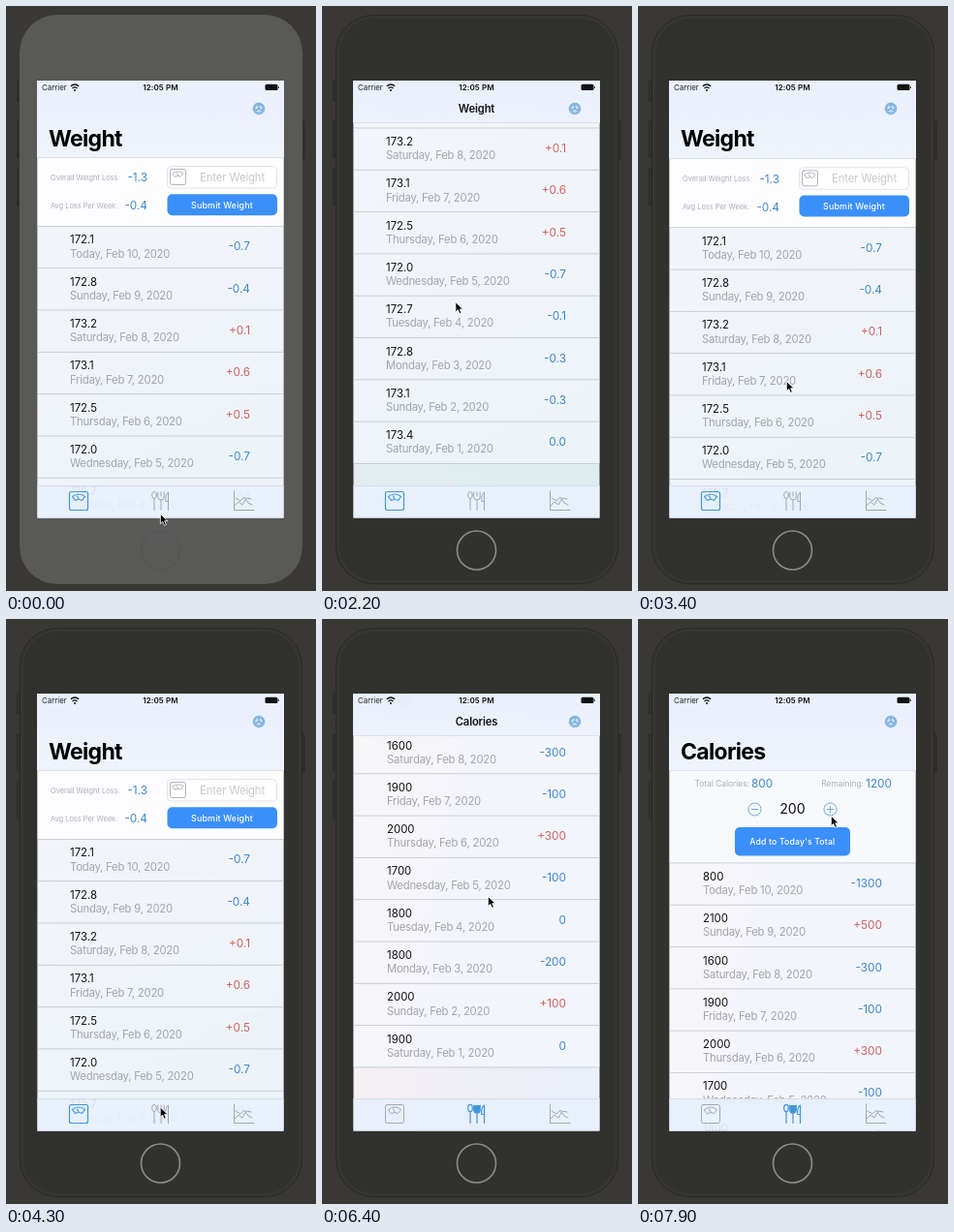
Write an HTML page that moves like this. It is 320x604 px and loops after 8 s.

```html
<!DOCTYPE html>
<html lang="en">
<head>
<meta charset="utf-8">
<title>Weight and calories</title>
<style>
  html, body { margin: 0; width: 100%; height: 100%; overflow: hidden; background: #393834; }
  #stage { position: relative; width: 320px; height: 604px; overflow: hidden; }
  #stage svg, #screen, .bar { position: absolute; left: 0; top: 0; }
  #screen { width: 320px; height: 604px; clip-path: inset(77.5px 33.5px 75.5px 32.5px); }
  svg { display: block; font-family: Inter, Roboto, sans-serif; }
  .bar { left: 32px; width: 255px; box-sizing: border-box; }
  #nav { top: 77px; background: linear-gradient(#e8effcec, #edf2fcec); backdrop-filter: blur(5px);
    border-bottom: 1px solid #dce1e8; }
  #tabs { top: 495px; height: 34px; background: #e8f1fcee; border-top: 1px solid #d6dde6; }
  .icon { fill: none; stroke: #a3a7af; stroke-linecap: round; stroke-linejoin: round; }
  .icon.on { stroke: #4296d8; stroke-width: 1.2; }
  .icon.on .solid { fill: #4296d8; }
</style>
</head>
<body>
<div id="stage">
  <svg width="320" height="604">
    <g fill="#31312f" stroke="#272725" stroke-width=".8">
      <rect x="11.5" y="77" width="5" height="21" rx="1"/>
      <rect x="11.5" y="119" width="5" height="38" rx="1"/>
      <rect x="11.5" y="167" width="5" height="39" rx="1"/>
      <rect x="303" y="119" width="5" height="39" rx="1"/>
    </g>
    <rect x="14.5" y="9.5" width="291" height="587" rx="39" fill="#363634" stroke="#282826"/>
    <rect x="18" y="13" width="284" height="580" rx="36" fill="#31312f"/>
    <circle cx="159.5" cy="562" r="20" fill="none" stroke="#8b8b89" stroke-width="1.6"/>
    <g id="veil">
      <rect x="14" y="9" width="292" height="588" rx="39" fill="#595a58"/>
      <circle cx="159.5" cy="562" r="20" fill="none" stroke="#51535a" stroke-width="1.2"/>
    </g>
  </svg>

  <div id="screen">
    <svg width="320" height="604">
      <defs>
        <g id="scale">
          <rect x="-9.5" y="-9.5" width="19" height="19" rx="2"/>
          <path d="M-6.5-4.5Q0-9.500 6.500-4.500L3.500-.5Q0-2.500-3.500-.5zM0-2L-1.500-5"/>
        </g>
        <linearGradient id="cool" x2=".3" y2="1">
          <stop stop-color="#eceff5"/><stop offset=".6" stop-color="#e8edf1"/><stop offset="1" stop-color="#deecf0"/>
        </linearGradient>
        <linearGradient id="warm" x2="1" y2=".3">
          <stop stop-color="#f9f3ee"/><stop offset=".4" stop-color="#f3eff5"/><stop offset="1" stop-color="#ebeff7"/>
        </linearGradient>
      </defs>
      <g id="weight">
        <rect x="32" y="77" width="255" height="452" fill="url(#cool)"/>
        <g class="list"></g>
      </g>
      <g id="calories">
        <rect x="32" y="77" width="255" height="452" fill="url(#warm)"/>
        <g class="list"></g>
      </g>
    </svg>
    <div id="nav" class="bar"></div>
    <svg id="navText" width="320" height="604"></svg>
    <div id="tabs" class="bar"></div>
    <svg width="320" height="604">
      <g class="icon on" id="tabWeight"><use href="#scale" x="75" y="511"/></g>
      <g class="icon" id="tabFood">
        <ellipse cx="153" cy="505" rx="2.300" ry="3.600"/>
        <path d="M153 508.600V520.500M160 510V520.500M160 502v4"/>
        <path class="solid" d="M156.800 502v5q0 3 3.200 3t3.200-3v-5"/>
        <path d="M167.500 520.500V502q-3.200 2-2.700 9.500h2.700"/>
      </g>
      <g class="icon">
        <path d="M235.500 501v19.500H256M236 516l4-4 4 3 4-7 5 1M237 508l5 3 4-4 4 6 4 2"/>
      </g>
    </svg>
  </div>

  <svg width="320" height="604">
    <g id="cursor">
      <circle id="touch" r="14.800" fill="#ffffff30" stroke="#1c1c1c" stroke-width="1.2"/>
      <path d="M-.6-.6v10.200l2.400-2.200 1.700 3.900 1.900-.8-1.700-3.800h3.300z" fill="#000" stroke="#fff" stroke-width=".8"/>
    </g>
  </svg>
</div>

<script>
const LOOP = 8000, ROW = 43.3, SWIPE = 250, HOLD = 350;
const BLUE = '#3f87cb', RED = '#cf615f', GRAY = '#a2a5aa', PALE = '#acaeb8', BUTTON = '#3b8ff9';
const $ = s => document.querySelector(s);

const text = (x, y, str, size, fill, more = '') =>
  `<text x="${x}" y="${y}" font-size="${size}" fill="${fill}" ${more}>${str}</text>`;
const box = (x, y, w, h, fill, more = '') =>
  `<rect x="${x}" y="${y}" width="${w}" height="${h}" fill="${fill}" ${more}/>`;
const END = 'text-anchor="end"', MID = 'text-anchor="middle"';
const label = MID + ' font-weight="500" letter-spacing=".15"';

// Each row shows its value, its date and the change since the day before
function rows(values, top, x, digits) {
  const days = ['Monday', 'Sunday', 'Saturday', 'Friday', 'Thursday', 'Wednesday', 'Tuesday'];
  const height = values.length * ROW;
  const line = y => box(x - 33.5, y, 255, .8, '#c3c7cc');
  return box(32, top, 255, height, '#f7faff', 'opacity=".6"') + values.map((v, i) => {
    const y = top + i * ROW;
    const diff = v - (values[i + 1] ?? v);
    const sum = diff.toFixed(digits);
    return line(y) +
      text(x, y + 18.4, v.toFixed(digits), 11.4, '#111') +
      text(x, y + 32.6, `${i ? days[i % 7] : 'Today'}, Feb ${10 - i}, 2020`, 11.3, GRAY, 'letter-spacing="-.22"') +
      text(252, y + 25.4, diff > 0 ? '+' + sum : sum, 11.8, diff > 0 ? RED : BLUE, END);
  }).join('') + line(top + height);
}

const stat = (y, name, value) =>
  text(46, y, name, 7.4, PALE) + text(146, y + 1.8, value, 11.8, BLUE, END);

$('#weight .list').innerHTML =
  box(32, 77, 255, 150, '#fdfdff') +
  stat(179.5, 'Overall Weight Loss:', '-1.3') +
  stat(208.5, 'Avg Loss Per Week:', '-0.4') +
  box(166.5, 165.5, 113, 22.5, '#fff', 'rx="4" stroke="#e2e4e9"') +
  '<g class="icon" transform="translate(177.500 176.500) scale(.84)"><use href="#scale"/></g>' +
  text(200, 181, 'Enter Weight', 11.3, '#c6c8cd', 'letter-spacing="-.1"') +
  box(166.5, 194.2, 113.5, 22, BUTTON, 'rx="5"') +
  text(223, 208.6, 'Submit Weight', 8.9, '#fff', label) +
  rows([172.1, 172.8, 173.2, 173.1, 172.5, 172, 172.7, 172.8, 173.1, 173.4], 227, 66, 1);

const knob = (x, extra) =>
  `<path d="M${x - 3.5} 196.500h7${extra}M${x - 6.5} 196.500a6.500 6.500 0 1 1 0 .01" fill="none" stroke="#6ea6d8"/>`;

$('#calories .list').innerHTML =
  box(32, 77, 255, 174.5, '#f7f9fd') +
  text(115, 172.7, 'Total Calories:', 8.4, PALE, END) + text(117, 173.8, '800', 11.8, BLUE) +
  text(233, 172.7, 'Remaining:', 8.4, PALE, END) + text(262, 173.8, '1200', 11.8, BLUE, END) +
  knob(120.5, '') + knob(198.5, 'm-3.500-3.500v7') +
  text(159.5, 201.3, '200', 14.2, '#111', MID) +
  box(100, 215, 119, 29.5, BUTTON, 'rx="5"') +
  text(159.3, 233, "Add to Today's Total", 8.7, '#fff', label) +
  rows([800, 2100, 1600, 1900, 2000, 1700, 1800, 1800, 2000, 1900], 251.5, 67, 0);

const spokes = [0, 120, 240].map(a => `<path d="M261 106v-4.500" transform="rotate(${a} 261 106)"/>`).join('');
$('#navText').innerHTML =
  '<clipPath id="below"><rect y="120" width="320" height="300"/></clipPath>' +
  '<g clip-path="url(#below)">' +
  text(44, 0, '', 23, '#000', 'id="big" font-weight="700" letter-spacing="-.7"') + '</g>' +
  text(159.5, 110, '', 11.2, '#111', 'id="small" font-weight="600" letter-spacing="-.15" ' + MID) +
  text(37, 87, 'Carrier', 7.9, '#222') +
  text(159.5, 87, '12:05 PM', 8, '#111', MID + ' font-weight="600" letter-spacing=".1"') +
  '<path d="M66.800 82.800q4.200-3.600 8.400 0M68.500 84.900q2.500-2 5 0" fill="none" stroke="#111" stroke-width="1.300"/>' +
  '<circle cx="71" cy="87" r="1" fill="#111"/>' +
  box(267.5, 80.8, 13, 6.2, '#111', 'rx="1.500"') + box(281, 83, 1, 2, '#555') +
  '<g fill="#c6dff3" stroke="#6ba3d6" stroke-width="1.100"><circle cx="261" cy="106" r="5.700" stroke-dasharray="1.700 .5"/>' +
  '<circle cx="261" cy="106" r="4.300"/>' + spokes + '</g>';

const clamp = v => Math.max(0, Math.min(1, v));
const ease = v => { const u = clamp(v); return u * u * (3 - 2 * u); };

// up and down are the times at which the list is swiped
const pages = [
  { title: 'Weight', el: $('#weight'), tab: $('#tabWeight'), max: 188, up: 1430, down: 2700 },
  { title: 'Calories', el: $('#calories'), tab: $('#tabFood'), max: 222, up: 6040, down: 6920 }
];
const TAP = 4400, SWITCH = 4500;

// Cursor stops: time, x, y
const stops = [
  [0, 160, 525], [1430, 150, 516], [1700, 142, 369], [2700, 135, 244], [3080, 150, 522],
  [3400, 154, 388], [4400, 160, 508], [5400, 204, 333], [5940, 177, 560],
  [6400, 172, 287], [6920, 174, 289], [7300, 191, 515], [7900, 200, 204]
];

function cursorAt(t) {
  const i = stops.findIndex(s => s[0] > t);
  if (i < 0) return stops.at(-1).slice(1);
  const [t0, x0, y0] = stops[i - 1], [t1, x1, y1] = stops[i];
  const u = ease((t - t0) / (t1 - t0));
  return [x0 + (x1 - x0) * u, y0 + (y1 - y0) * u];
}

function scrollAt(t, { max, up, down }) {
  const bounce = Math.sin(Math.PI * clamp((t - down - SWIPE) / 480)) ** 2;
  return max * (ease((t - up) / SWIPE) - ease((t - down) / SWIPE)) - 38 * bounce;
}

const held = (t, from, length = HOLD) => t >= from && t < from + length;
const pressed = t => held(t, TAP, 150) || pages.some(p => held(t, p.up) || held(t, p.down));

const nav = $('#nav'), big = $('#big'), small = $('#small');
const veil = $('#veil'), cursor = $('#cursor'), touch = $('#touch');
const lists = pages.map(p => p.el.querySelector('.list'));

function draw(t) {
  const open = t < SWITCH ? 0 : 1;
  const scroll = scrollAt(t, pages[open]);

  pages.forEach((p, i) => {
    p.el.style.display = i === open ? '' : 'none';
    p.tab.classList.toggle('on', i === open);
  });
  lists[open].setAttribute('transform', `translate(0 ${-scroll})`);
  nav.style.height = Math.max(44, 79.5 - scroll) + 'px';
  big.textContent = small.textContent = pages[open].title;
  big.setAttribute('y', 144.6 - Math.max(0, scroll));
  small.style.opacity = clamp((scroll - 22) / 12);

  veil.style.opacity = 1 - clamp((t - 80) / 300);
  cursor.setAttribute('transform', `translate(${cursorAt(t)})`);
  touch.style.display = pressed(t) ? '' : 'none';
}

const start = performance.now();
function tick() {
  draw((performance.now() - start) % LOOP);
  requestAnimationFrame(tick);
}
tick();
</script>
</body>
</html>
```
